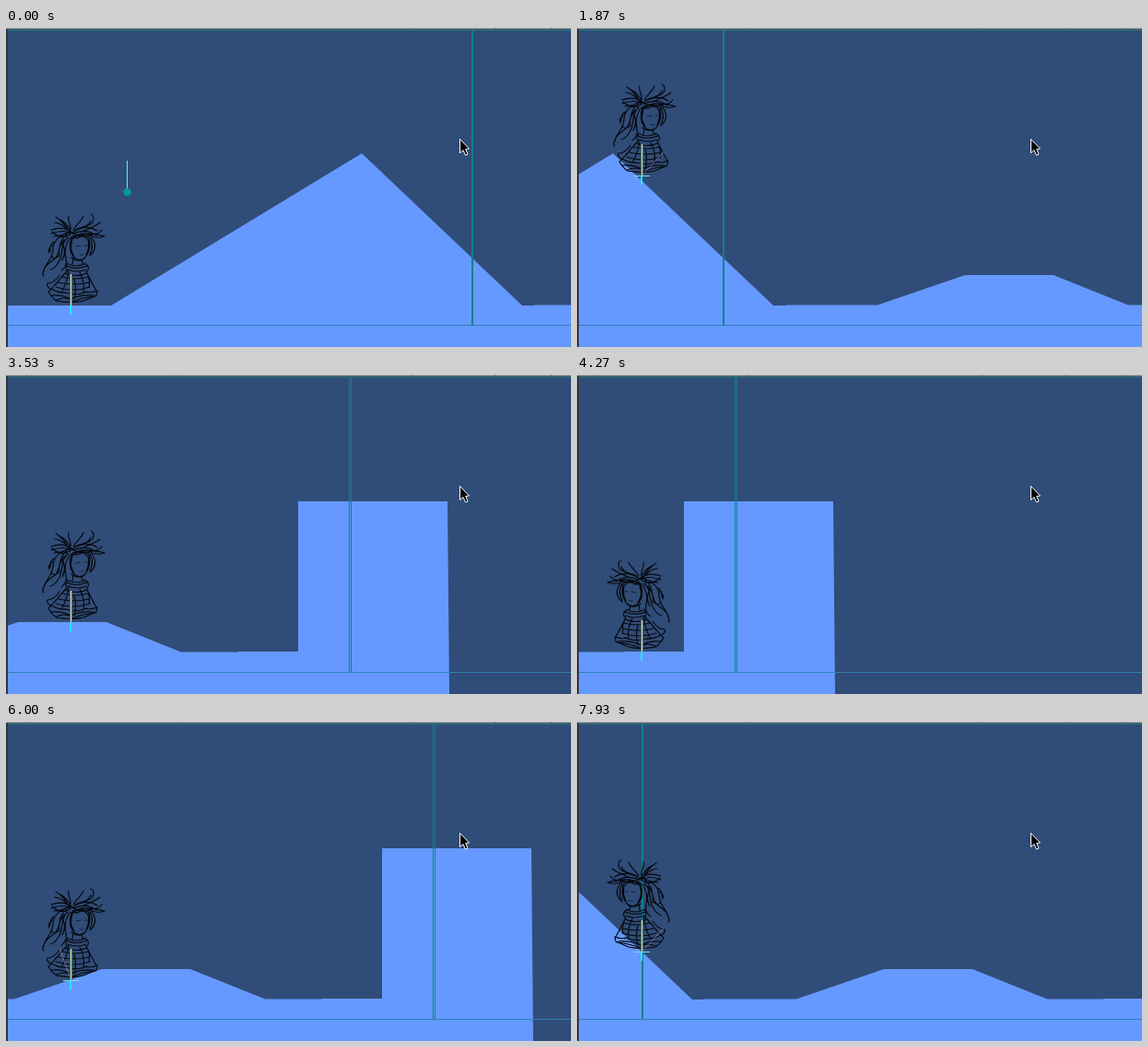
These frames come from a looping animation (613 by 346 pixels, 8 s). An HTML page with a canvas:

```html
<!DOCTYPE html>
<html lang="en">
<head>
<meta charset="utf-8">
<title>Slope walking test</title>
<style>
  html, body { margin: 0; width: 100%; height: 100%; overflow: hidden; background: #304c78; }
  canvas { display: block; }
</style>
</head>
<body>
<canvas id="stage" width="613" height="346"></canvas>
<script>
const ctx = document.getElementById('stage').getContext('2d');
const W = 613, H = 346, LOOP = 8000, STEP = 200 / 3;
const PLAYER_X = 70, BASE_Y = 301;
const SKY = '#304c78', GROUND = '#6699ff', TEAL = '#0b838b';

// Surface of the level in world coordinates
const terrain = [
  [-20, 301], [114, 301], [386, 136], [560, 301], [573, 301], [574, 300.5],
  [673, 300.5], [768, 268], [864, 268], [945, 300.5], [1006, 300.5],
  [1007, 300], [1072, 300], [1072, 137], [1234, 137], [1236, 346]
];

// Camera keys: time, position, velocity (px per ms)
const cameraKeys = [
  [0, 0, 0.02], [600, 80, 0.2], [1870, 348, 0.215], [2430, 490, 0.28],
  [2800, 600, 0.25], [3470, 735, 0.3], [4100, 938, 0.2], [4270, 956, -0.02],
  [4650, 900, -0.29], [5200, 725, -0.33], [5620, 610, 0], [6100, 685, 0.2],
  [6380, 720, 0], [6730, 668, -0.25], [6930, 612, -0.28], [7300, 515, -0.22],
  [7930, 435, -0.1], [8000, 429, -0.08]
];
const turnTimes = [4150, 5500, 6250];

const hair = new Path2D(`
  M70 224 C66 216 60 208 54 205 M71 222 C62 214 60 212 53 211 M70 219 C65 212 63 210 57 207
  M70 219 C71 211 66 209 68 204 M73 219 C77 212 82 210 84 204 M77 218 C86 215 95 214 95 207 Q95 203 92 202
  M75 219 Q89 217 92 209 M82 221 C92 217 98 214 102 211 M82 223 Q94 222 107 226 Q98 229 91 225
  M88 224 Q100 225 104 219 M49 219 Q63 214 72 222 Q86 212 99 220 M49 223 Q62 218 73 223 Q87 217 98 225
  M50 221 Q60 230 69 224 M52 226 Q61 226 68 221 M72 222 Q82 229 94 224
  M68 222 C56 226 51 232 51 240 C51 250 43 255 41 263 Q39 267 41 269
  M66 224 C55 232 61 243 53 250 C47 255 42 257 41 264
  M67 227 C58 235 63 246 57 254 Q53 261 48 262 M69 228 Q62 239 65 250 Q67 258 60 263
  M63 230 Q56 238 58 247 Q51 252 49 247 M61 233 Q66 243 61 252
  M52 232 Q47 236 48 242 M50 236 Q45 240 47 244 M91 227 Q96 237 91 245 M93 227 Q101 238 91 247`);
const face = new Path2D(`
  M71 228 Q67 240 73 248 Q79 255 86 249 Q93 240 90 228 Q86 222 78 224 Q72 225 70 233
  M72 229 Q68 239 74 248 M74 227 Q82 221 89 230 Q91 238 87 246 M73 225 Q70 236 70 243
  M71 249 Q77 254 84 251 M70 227 Q77 230 84 224`);
const dress = new Path2D(`
  M73 250 L72 256 M82 251 L83 256 M68 256 Q76 260 85 256 M67 255 Q63 262 67 264 M85 255 Q92 259 88 264
  M66 258 Q75 263 88 258 M67 262 Q78 266 87 262 M66 264 Q58 272 54 278 M87 264 Q92 273 90 281
  M64 266 Q76 271 88 266 M61 270 Q75 274 89 270 M57 276 Q74 280 90 276 M54 281 Q73 287 91 281
  M54 277 Q49 284 46 286 Q50 293 55 296 Q72 299 84 296 L98 290 L99 285 Q91 288 86 286
  M49 283 Q58 288 65 287 Q75 291 88 286 M49 290 Q62 289 70 294 Q80 289 95 290
  M55 295 Q63 291 71 295 M72 297 Q84 292 97 291 M58 268 Q52 277 45 277 Q43 279 48 283
  M68 264 Q66 277 60 287 M80 265 Q86 276 84 288 M74 273 Q77 283 74 294 M88 266 Q94 278 98 285`);
const features = new Path2D('M76 237 l5 -1 M85 236 l4 0 M80 246 l4 0');

function cameraAt(time) {
  const t = Math.max(0, Math.min(time, LOOP));
  const i = Math.max(1, cameraKeys.findIndex(key => key[0] >= t));
  const [t0, x0, v0] = cameraKeys[i - 1], [t1, x1, v1] = cameraKeys[i];
  const d = t1 - t0, u = (t - t0) / d, u2 = u * u, u3 = u2 * u;
  return (2 * u3 - 3 * u2 + 1) * x0 + (u3 - 2 * u2 + u) * d * v0 +
         (3 * u2 - 2 * u3) * x1 + (u3 - u2) * d * v1;
}

function groundAt(x) {
  const i = terrain.findIndex(point => point[0] > x);
  const [x0, y0] = terrain[i - 1], [x1, y1] = terrain[i];
  const slope = (y1 - y0) / (x1 - x0);
  return { y: y0 + slope * (x - x0), slope: Math.abs(slope) > 0.2 && x1 - x0 > 5 ? slope : 0 };
}

function rect(color, x, y, w, h) {
  ctx.fillStyle = color;
  ctx.fillRect(x, y, w, h);
}

function polygon(points, fill) {
  ctx.beginPath();
  points.forEach(([x, y]) => ctx.lineTo(x, y));
  ctx.closePath();
  ctx.fillStyle = fill;
  ctx.fill();
}

function line(color, x0, y0, x1, y1) {
  ctx.strokeStyle = color;
  ctx.lineWidth = 1;
  ctx.beginPath();
  ctx.moveTo(x0, y0);
  ctx.lineTo(x1, y1);
  ctx.stroke();
}

function drawLevel(cam) {
  rect(SKY, 0, 0, W, H);
  ctx.save();
  ctx.translate(-cam, 0);
  polygon([...terrain, [-20, H]], GROUND);
  rect(TEAL, 505, 2, 2, 320);
  rect(TEAL, 1127, 2, 1, 320);
  rect(TEAL, 1129, 2, 1, 320);
  rect('#66eeee', 131, 144, 1, 31);
  ctx.fillStyle = '#009999';
  ctx.beginPath();
  ctx.arc(131.5, 178, 4.3, 0, 7);
  ctx.fill();
  ctx.restore();
  rect('#2b83b5', 0, 322, W, 1);
}

function drawPlayer(y, slope, facing) {
  ctx.save();
  ctx.translate(PLAYER_X, y);
  ctx.save();
  ctx.scale(facing, 1);
  ctx.translate(-PLAYER_X, -BASE_Y);
  ctx.strokeStyle = '#05070c';
  ctx.lineCap = ctx.lineJoin = 'round';
  ctx.lineWidth = 1.15;
  [hair, face, dress].forEach(path => ctx.stroke(path));
  ctx.lineWidth = 0.6;
  ctx.stroke(features);
  ctx.restore();

  if (slope) {
    const length = Math.hypot(1, slope);
    line('rgba(190,130,190,.6)', 0.5, 0, 36 * slope / length, -36 / length);
    rect('#7fd9ef', -8, 0, 17, 1);
  }
  rect('#51665f', -1, -34, 3, 34);
  rect(slope ? '#a5eeb2' : '#d9dcc0', 0, -34, 1, 34);
  rect('#20e8ff', -1, 0, 2, 10);
  ctx.restore();
}

function drawOverlay() {
  rect('#8b919d', 0, 0, W, 1);
  rect('#4b5667', 0, 1, W, 1);
  rect('#16777f', 2, 2, W, 1);
  [22, 184, 439, 530, 591].forEach(x => rect('#555b66', x, 0, 1, 1));
  rect('#30353e', 0, 1, 2, H);
  const arrow = [[492.5, 120.5], [492.5, 135.5], [496, 132.5], [498.5, 138],
    [501, 137], [498.7, 131.5], [502.5, 131]];
  polygon(arrow, '#000');
  ctx.strokeStyle = '#fff';
  ctx.lineWidth = 1;
  ctx.stroke();
}

function draw(now) {
  const time = Math.floor((now % LOOP + 5) / STEP) * STEP;
  const cam = Math.round(cameraAt(time));
  const here = groundAt(cam + PLAYER_X);
  // Going downhill, the feet trail the surface slightly
  const before = groundAt(cameraAt(time - 26) + PLAYER_X);
  const facing = turnTimes.filter(t => time >= t).length % 2 ? -1 : 1;
  drawLevel(cam);
  drawPlayer(Math.round(Math.min(here.y, before.y)), here.slope, facing);
  drawOverlay();
}

const start = performance.now();
function tick() {
  draw(performance.now() - start);
  requestAnimationFrame(tick);
}
tick();
</script>
</body>
</html>
```
